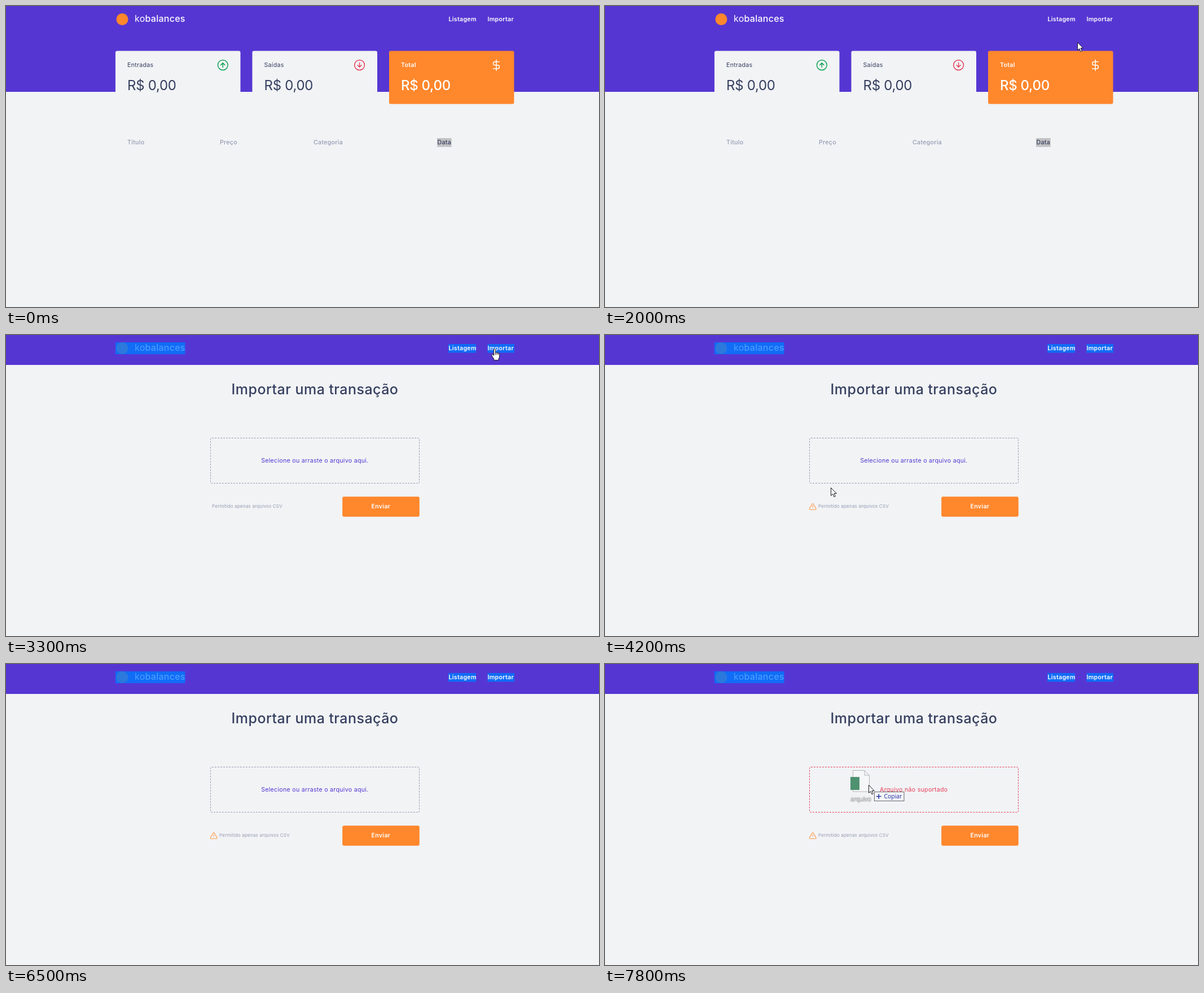
An HTML page that plays this animation: 1051x533 px, repeating every 8000 ms.

```html
<!DOCTYPE html>
<html lang="pt-BR">
<head>
<meta charset="utf-8">
<title>Importar</title>
<style>
  html, body { margin: 0; width: 100%; height: 100%; overflow: hidden; background: #f1f3f5; }
  svg { display: block; width: 1051px; height: 533px; }
  text { font: 10.7px Inter, "Open Sans", sans-serif; letter-spacing: .25px; fill: #363f5f; white-space: pre; }
  .m { font-weight: 500; }
  .b { font-weight: 600; }
  .mid { text-anchor: middle; }
  .value { font-size: 24px; letter-spacing: -.3px; }
  .title { font-size: 25px; letter-spacing: .45px; font-weight: 500; }
  .brand { font-size: 16px; fill: #fff; }
  .white { fill: #fff; }
  .muted { fill: #969cb3; }
  .note { font-size: 8px; letter-spacing: .2px; fill: #969cb3; }
  .sys { font: 10.4px "Open Sans", "Noto Sans", sans-serif; letter-spacing: 0; }
  .line { fill: none; stroke-width: 1.5; stroke-linecap: round; stroke-linejoin: round; }
  #zone { box-sizing: border-box; width: 371px; height: 81px; border: 1px dashed; border-radius: 3px; }
</style>
</head>
<body>
<svg viewBox="0 0 1051 533">
  <rect width="1051" height="533" fill="#f1f3f5"/>
  <rect id="header" width="1051" height="152" fill="#5636d3"/>

  <g id="selection" fill="#116cf6">
    <rect x="194" y="13" width="123.5" height="21"/>
    <rect x="784" y="16" width="49" height="15.5"/>
  </g>
  <circle id="mark" cx="206" cy="23.5" r="10.5"/>
  <text id="brand" class="brand" x="228" y="28">ko<tspan class="m">balances</tspan></text>
  <text class="b white" x="784.5" y="27">Listagem</text>
  <g id="navImport">
    <rect id="navMark" x="853.5" y="16" width="47.5" height="15.5" fill="#116cf6"/>
    <text class="b white" x="853.5" y="27">Importar</text>
  </g>

  <g id="listPage">
    <g id="cards"></g>
    <g class="line" stroke="#12a454">
      <circle cx="384.3" cy="104.6" r="8.9"/>
      <path d="M384.3 108.5V101M380.8 104.4L384.3 100.9 387.8 104.4"/>
    </g>
    <g class="line" stroke="#e83f5b">
      <circle cx="626.6" cy="104.6" r="8.9"/>
      <path d="M626.6 100.8V108.2M623.1 104.8L626.6 108.3 630.1 104.8"/>
    </g>
    <path class="line" stroke="#fff" d="M869 95.2V114.5M874 98.7H866.7A3 3 0 0 0 866.7 104.8H871.3A3.1 3.1 0 0 1 871.3 111H863.5"/>
    <text class="m muted" x="215" y="245">Título</text>
    <text class="m muted" x="379" y="245">Preço</text>
    <text class="m muted" x="545" y="245">Categoria</text>
    <rect id="dateMark" x="764" y="234" width="25.7" height="15.5"/>
    <text id="date" class="m" x="764.5" y="245">Data</text>
  </g>

  <g id="importPage">
    <text class="title mid" x="547.5" y="105">Importar uma transação</text>
    <foreignObject x="362" y="182" width="371" height="81"><div id="zone"></div></foreignObject>
    <text id="zoneText" class="mid" x="547.3" y="226"></text>
    <g id="warning" class="line" stroke="#ff9a48" style="stroke-width:1.1">
      <path d="M367.3 299.3L362.5 307.4Q362 309 363.5 309.2H373Q374.5 309 374 307.4L369.2 299.3Q368.2 298 367.3 299.3ZM368.2 302.2V304.7M368.2 306.7V306.8"/>
    </g>
    <text id="note" class="note" y="306">Permitido apenas arquivos CSV</text>
    <rect x="596.2" y="286.3" width="136.6" height="35.4" rx="3" fill="#ff872c"/>
    <text class="b white mid" x="664.4" y="307.2">Enviar</text>
  </g>

  <g id="drag">
    <path d="M-36.5 -25.5H-16L-7.5 -17V12H-36.5ZM-16 -25.5V-17H-7.5" fill="#f6f7f8" stroke="#b3b5b7"/>
    <rect x="-41" y="-14" width="16" height="23" fill="#4f9270"/>
    <text class="sys mid" x="-22.5" y="28" style="fill:#fff;text-shadow:0 1px 2px #444,0 0 1px #888">arquivo</text>
    <rect x="1.5" y="12.5" width="52.5" height="16" fill="#f3f4f6" stroke="#67676c"/>
    <path id="tipIcon" class="line" stroke="#2030a0"/>
    <text id="tipText" class="sys" x="18.5" y="24.3" style="fill:#1d2aa5"></text>
  </g>
  <path id="arrow" d="M.5 .5V14.4L3.7 11.4 6 16.7 8.3 15.7 6 10.6H10.3Z" fill="#fff" stroke="#16161e" stroke-linejoin="round"/>
  <path id="hand" d="M-1.4 11V1.6Q-1 .4 .2 .5 1.3 .6 1.4 1.8V7Q3 5.8 4 7.6 5.6 6.6 6.5 8.3 8.6 7.8 8.7 10V14Q8.6 16.5 7 18V20.6H-1.2V18.6L-4.8 13Q-5.8 11 -4.3 10.5 -3 10.2 -1.4 12.2ZM1.4 7V11M4 7.6V11M6.5 8.3V11" fill="#fff" stroke="#16161e" stroke-linejoin="round"/>
</svg>
<script>
const LOOP = 8000, STEP = 100;
const ui = Object.fromEntries([...document.querySelectorAll('[id]')].map(el => [el.id, el]));

const card = (x, label, fill, tone) => `
  <rect x="${x}" y="79.5" width="221.5" height="94" rx="3" fill="${fill}"/>
  <text class="${tone ? 'b' : ''} ${tone}" x="${x + 21}" y="108">${label}</text>
  <text class="value ${tone ? 'm' : ''} ${tone}" x="${x + 21}" y="149">R$ 0,00</text>`;
ui.cards.innerHTML = card(194, 'Entradas', '#f1f3f5', '')
  + card(436.5, 'Saídas', '#f1f3f5', '')
  + card(679, 'Total', '#ff872c', 'white');

// Each point is [time, x, y].
const pointerPath = [
  [500, 107, 17], [800, 235, 95], [1300, 498, 273], [1400, 517, 276], [1500, 517, 276],
  [1600, 430, 240], [1700, 255, 170], [1800, 460, 140], [1900, 700, 98], [2000, 837, 64],
  [2300, 853, 40], [2600, 853, 40], [2700, 859, 31], [2800, 866, 24], [3900, 866, 24],
  [4000, 800, 65], [4200, 400, 270], [4300, 430, 286], [4500, 691, 244],
  [4800, 691, 244], [4900, 620, 215], [5100, 254, 88]
];
const dragPath = [
  [6700, 20, 170], [6800, 160, 156], [6900, 283, 136], [7000, 372, 122], [7100, 404, 115],
  [7200, 404, 115], [7300, 410, 122], [7600, 447, 188], [7800, 476, 214]
];

function along(path, t) {
  const i = path.findIndex(p => p[0] > t);
  if (i < 0) return path.at(-1).slice(1);
  if (i === 0) return path[0].slice(1);
  const [a, b] = [path[i - 1], path[i]];
  const k = (t - a[0]) / (b[0] - a[0]);
  return [a[1] + (b[1] - a[1]) * k, a[2] + (b[2] - a[2]) * k];
}

const within = (t, from, to) => t >= from && t < to;
const show = (el, on) => el.style.display = on ? '' : 'none';
const place = (el, x, y) => el.setAttribute('transform', `translate(${Math.round(x)} ${Math.round(y)})`);
const paint = (el, color) => el.style.fill = color;
const inZone = (x, y) => x > 362 && x < 733 && y > 182 && y < 263;

function render(t) {
  const importing = t >= 3300, dragging = t >= 6700;
  const [x, y] = along(dragging ? dragPath : pointerPath, t);
  const overZone = importing && inZone(x, y);
  const rejected = dragging && overZone;

  show(ui.listPage, !importing);
  show(ui.importPage, importing);
  show(ui.selection, importing);
  show(ui.navMark, importing);
  ui.header.setAttribute('height', importing ? 53 : 152);
  paint(ui.mark, importing ? '#2b79dc' : '#ff872c');
  paint(ui.brand, importing ? '#499eff' : '#fff');
  ui.navImport.style.opacity = within(t, 2800, 3300) || within(t, 3500, 4000) ? .6 : 1;

  const focused = t >= 3000;
  paint(ui.dateMark, focused ? '#3390ff' : '#c1c1c3');
  paint(ui.date, focused ? '#fff' : '#363f5f');

  show(ui.warning, t >= 3400);
  ui.note.setAttribute('x', t >= 3400 ? 378 : 365);
  ui.zone.style.borderColor = rejected ? '#e83f5b' : '#969cb3';
  ui.zoneText.textContent = rejected ? 'Arquivo não suportado' : 'Selecione ou arraste o arquivo aqui.';
  paint(ui.zoneText, rejected ? '#e83f5b' : '#5636d3');

  show(ui.drag, dragging);
  place(ui.drag, x, y);
  ui.tipText.textContent = rejected ? 'Copiar' : 'Mover';
  ui.tipIcon.setAttribute('d', rejected ? 'M5.5 20.5H13M9.2 16.8V24.2' : 'M4 20.5H13M9 16.5L13 20.5 9 24.5');

  const pointing = within(t, 2800, 4000) || (overZone && !dragging);
  const visible = within(t, 500, 5200) || dragging;
  show(ui.arrow, visible && !pointing);
  show(ui.hand, visible && pointing);
  place(ui.arrow, x - (rejected ? 9 : 0), y);
  place(ui.hand, x, y);
}

const start = performance.now();
function tick() {
  const t = (performance.now() - start) % LOOP;
  render(Math.floor(t / STEP) * STEP);
  requestAnimationFrame(tick);
}
tick();
</script>
</body>
</html>
```
